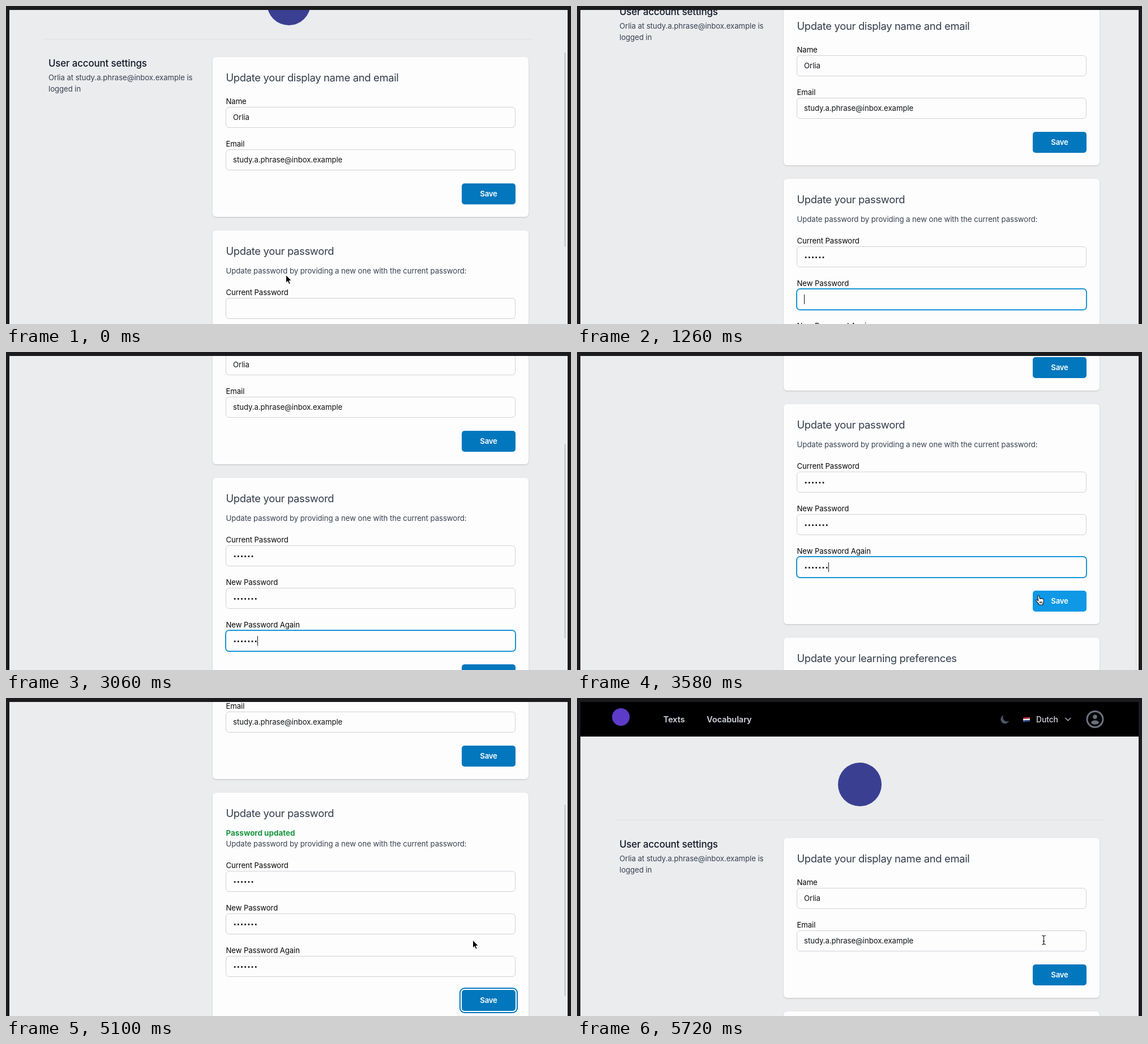
Animation, 998 px wide and 561 px high, one loop 5740 ms. Source, as an HTML page:

```html
<!DOCTYPE html>
<html lang="en">
<head>
<meta charset="utf-8">
<title>Account settings</title>
<style>
html, body { margin: 0; width: 100%; height: 100%; overflow: hidden; background: #1b1b1e; }
body { font: 13.2px/20px Inter, "Open Sans", sans-serif; }
#stage { position: relative; width: 998px; height: 561px; overflow: hidden; background: #1b1b1e; }
#view { position: absolute; left: 6px; top: 7px; width: 986px; height: 554px; overflow: hidden; background: #ebecee; }
#page { position: absolute; left: -6px; top: -7px; width: 998px; height: 1600px; will-change: transform; }
#page div, #page svg, #bar, #cursor { position: absolute; }
.text { white-space: nowrap; color: #374151; letter-spacing: -.06px; }
.h1 { font-size: 16.9px; font-weight: 500; letter-spacing: -.15px; color: #111827; }
.h2 { font-size: 18.4px; letter-spacing: -.32px; color: #333d4b; }
.label { letter-spacing: -.1px; color: #08080a; }
.value { color: #101216; }
.good { font-size: 13.5px; font-weight: 700; letter-spacing: -.04px; color: #1a9641; }
.nav { font-size: 14.6px; font-weight: 600; letter-spacing: -.1px; color: #d2d6dc; }
.lang { font-size: 13.8px; font-weight: 500; color: #d2d6dc; }
.card { left: 365px; width: 558px; background: #fdfdfd; border-radius: 6px;
  box-shadow: 0 1px 3px rgba(0,0,0,.12), 0 1px 2px rgba(0,0,0,.08); }
.input { left: 388px; width: 512px; height: 37px; box-sizing: border-box;
  border: 1px solid #cfd2d8; border-radius: 6px; background: #fdfdfd; }
.input.focus { border-color: #1795d6; box-shadow: 0 0 0 1px #1795d6; }
.dots { left: 12px; top: 10px; height: 16px;
  background: radial-gradient(circle at 3.1px 8.5px, #15171c 1.2px, transparent 1.8px) 0 0 / 6.2px 16px repeat-x; }
.caret { top: 9px; width: 1px; height: 17px; background: #15171c; }
.button { left: 805px; width: 95px; height: 37px; border-radius: 5px; background: #0277bd; color: #fff;
  font-weight: 600; line-height: 37px; text-align: center; letter-spacing: -.2px; }
.button.hover { background: #0e98e6; }
.button.focus { box-shadow: 0 0 0 2px #fdfdfd, 0 0 0 4px #0277bd; }
.mark { border-radius: 50%; }
#bar { left: 985.5px; top: 0; width: 3px; border-radius: 2px; background: #cfcfd2; }
#cursor { left: 0; top: 0; width: 30px; height: 30px; overflow: visible; }
</style>
</head>
<body>
<div id="stage">
  <div id="view"><div id="page"></div></div>
  <div id="bar"></div>
  <svg id="cursor">
    <path id="arrow" d="M0 0V14L3.2 11.1 5.4 16.2 7.8 15.2 5.6 10.2H10Z" fill="#000" stroke="#fff" stroke-width="1" stroke-linejoin="round"/>
    <g id="beam" fill="none" stroke-linecap="round">
      <path d="M-3 -8Q0 -8 0 -5.5V5.5Q0 8 -3 8M3 -8Q0 -8 0 -5.5V5.5Q0 8 3 8M-1.5 2H1.5" stroke="#fff" stroke-width="2.4"/>
      <path d="M-3 -8Q0 -8 0 -5.5V5.5Q0 8 -3 8M3 -8Q0 -8 0 -5.5V5.5Q0 8 3 8M-1.5 2H1.5" stroke="#111" stroke-width="1.1"/>
    </g>
    <path id="hand" d="M-1.4 .6Q0 -1.2 1.4 .6L2.6 5.4Q4 4 5 5.3Q6.4 4.2 7.3 5.6Q9 5 9.2 7.2V11Q9 13 7.8 14.2V16H.8V14.5Q-1.8 12.2 -4.4 8.6Q-4.4 6.4 -2 7.6L-.2 9.2ZM2.6 10.3V13.2M4.4 10.3V13.2M6.2 10.3V13.2"
      fill="#fff" stroke="#111" stroke-width="1.1" stroke-linejoin="round"/>
  </svg>
</div>
<script>
const LOOP = 5740, STEP = 20;
const CLICK = 480, TAB1 = 1180, TAB2 = 1760, SUBMIT = 3900, SAVED = 4180;
const GROWTH = 19;
const NAME = 'Orlia', MAIL = 'study.a.phrase@inbox.example';

const $ = id => document.getElementById(id);
const page = $('page');

function box(cls, style = {}, parent = page, str = '') {
  const el = document.createElement('div');
  el.className = cls;
  el.textContent = str;
  for (const k in style) el.style[k] = typeof style[k] === 'number' ? style[k] + 'px' : style[k];
  return parent.appendChild(el);
}
// y is the middle of the capitals
const text = (x, y, str, cls = '', parent = page) =>
  box('text ' + cls, { left: x, top: y - 10 }, parent, str);

function field(y, label, value, parent) {
  text(388.5, y - 10.5, label, 'label', parent);
  const el = box('input', { top: y }, parent);
  if (value) text(12, 17, value, 'value', el);
  return { y, el, low: parent !== page };
}
function secret(y, label, parent) {
  const f = field(y, label, '', parent);
  f.dots = box('dots', {}, f.el);
  f.caret = box('caret', {}, f.el);
  return f;
}
const button = (y, parent) =>
  ({ y, el: box('button', { top: y }, parent, 'Save'), low: parent !== page });

// Header
box('', { left: 6, top: 7, width: 986, height: 61, background: '#000' });
box('mark', { left: 62, top: 18, width: 31, height: 31, background: '#5b3bc8' });
text(152.5, 38, 'Texts', 'nav');
text(229, 38, 'Vocabulary', 'nav');
text(811, 37.5, 'Dutch', 'lang');
page.insertAdjacentHTML('beforeend', `
<svg style="left:0;top:0" width="998" height="70">
  <path d="M753.5 30.5A7.6 7.6 0 1 0 763 40.6A7.2 7.2 0 0 1 753.5 30.5Z" fill="#4b5768"/>
  <g transform="translate(788 33.6) skewY(-4)">
    <path d="M0 .8H12V3.5H0Z" fill="#c3283a"/>
    <path d="M0 3.5H12V6.2H0Z" fill="#f4f4f4"/>
    <path d="M0 6.2H12V8.8H0Z" fill="#27498f"/>
  </g>
  <path d="M862.8 35.4L867.2 39.8 871.6 35.4" fill="none" stroke="#8b939f" stroke-width="1.8" stroke-linecap="round" stroke-linejoin="round"/>
  <g fill="#6b7280">
    <circle cx="915" cy="37.5" r="14" fill="none" stroke="#6b7280" stroke-width="3"/>
    <circle cx="915" cy="33.3" r="3.7"/>
    <path d="M908 43.5Q909.5 39.5 915 39.5T922 43.5Q919.5 46.7 915 46.7T908 43.5Z"/>
  </g>
</svg>`);

// Intro
box('mark', { left: 460.5, top: 114, width: 77, height: 77, background: '#3a3f92' });
box('', { left: 68, top: 215, width: 862, height: 1, background: '#dedee1' });
text(75, 258, 'User account settings', 'h1');
text(75, 283, `${NAME} at ${MAIL} is`);
text(75, 302.5, 'logged in');

// Profile card
box('card', { top: 246.5, height: 282.5 });
text(388.5, 283, 'Update your display name and email', 'h2');
const nameField = field(335, 'Name', NAME, page);
const mailField = field(410, 'Email', MAIL, page);
const saveName = button(470, page);

// Password card; everything under its title moves down once saved
const card = box('card', { top: 552.5 });
text(388.5, 589, 'Update your password', 'h2');
const notice = text(388.5, 624, 'Password updated', 'good');
const lower = box('', { left: 0, top: 0 });
text(388.5, 624, 'Update password by providing a new one with the current password:', '', lower);
const secrets = [
  secret(672, 'Current Password', lower),
  secret(747, 'New Password', lower),
  secret(822, 'New Password Again', lower)
];
const savePass = button(882, lower);
box('card', { top: 964.5, height: 400 }, lower);
text(388.5, 1001, 'Update your learning preferences', 'h2', lower);

const inputs = [nameField, mailField, ...secrets], buttons = [saveName, savePass];

// Rows of [time, value, ...]
const SCROLL = [
  [0, 157], [60, 181], [120, 208], [180, 229], [240, 242], [320, 248],
  [2960, 248], [3000, 276], [3060, 331], [3120, 378], [3200, 425], [3280, 450], [3380, 461],
  [5020, 461], [5060, 441], [5100, 386], [5180, 245], [5260, 130], [5340, 58], [5420, 20], [5500, 4], [5560, 0]
];
const BAR = [
  [0, 1], [440, 1], [580, 0], [2960, 0], [2980, 1], [3440, 1], [3580, .2], [3640, 0],
  [5020, 0], [5040, 1], [5600, 1], [5710, 0]
];
const POINTER = [
  [0, 494.5, 474.5], [120, 492, 468], [300, 486.5, 458], [3240, 486.5, 458],
  [3400, 700, 442], [3520, 815, 430], [4220, 815, 430], [4340, 824.5, 427]
];
// First key, pause between keys, number of keys
const TYPING = [[640, 84, 6], [1320, 66, 7], [1860, 80, 7]];

function at(rows, t) {
  const i = rows.findIndex(r => r[0] > t);
  if (i < 0) return rows[rows.length - 1].slice(1);
  const a = rows[i - 1], b = rows[i], k = (t - a[0]) / (b[0] - a[0]);
  return a.slice(1).map((v, j) => v + (b[j + 1] - v) * k);
}
const show = (el, on) => { el.style.display = on ? '' : 'none'; };

function draw(t) {
  const [scroll] = at(SCROLL, t), [x, y] = at(POINTER, t);
  const shift = t >= SAVED ? GROWTH : 0;
  page.style.transform = `translateY(${-scroll}px)`;
  lower.style.transform = `translateY(${shift}px)`;
  card.style.height = 388.5 + shift + 'px';
  show(notice, shift);

  const focus = t < CLICK || t >= SUBMIT ? -1 : t < TAB1 ? 0 : t < TAB2 ? 1 : 2;
  secrets.forEach((f, i) => {
    const [start, gap, max] = TYPING[i];
    const n = Math.max(0, Math.min(max, Math.floor((t - start) / gap) + 1));
    f.dots.style.width = n * 6.2 + 'px';
    f.caret.style.left = 12 + n * 6.2 + 'px';
    show(f.caret, focus === i);
    f.el.classList.toggle('focus', focus === i);
  });

  const over = o => {
    const top = o.y - scroll + (o.low ? shift : 0);
    return y >= top && y <= top + 37;
  };
  const visible = t < 640 || t >= 3260;
  const onInput = x > 388 && x < 900 && inputs.some(over);
  let onButton = false;
  for (const b of buttons) {
    const hit = visible && x > 805 && x < 900 && over(b);
    b.el.classList.toggle('hover', hit);
    onButton = onButton || hit;
  }
  savePass.el.classList.toggle('focus', t >= SUBMIT);

  show($('cursor'), visible);
  $('cursor').style.transform = `translate(${x}px, ${y}px)`;
  show($('hand'), onButton);
  show($('beam'), onInput);
  show($('arrow'), !onButton && !onInput);

  const bar = $('bar').style;
  bar.opacity = at(BAR, t)[0];
  bar.height = (shift ? 338 : 343) + 'px';
  bar.transform = `translateY(${9 + scroll * .463}px)`;
}

// The picture advances in steps of 20 ms
const begin = performance.now();
function tick() {
  const t = (performance.now() - begin) % LOOP;
  draw(Math.floor(t / STEP) * STEP);
  requestAnimationFrame(tick);
}
tick();
</script>
</body>
</html>
```
